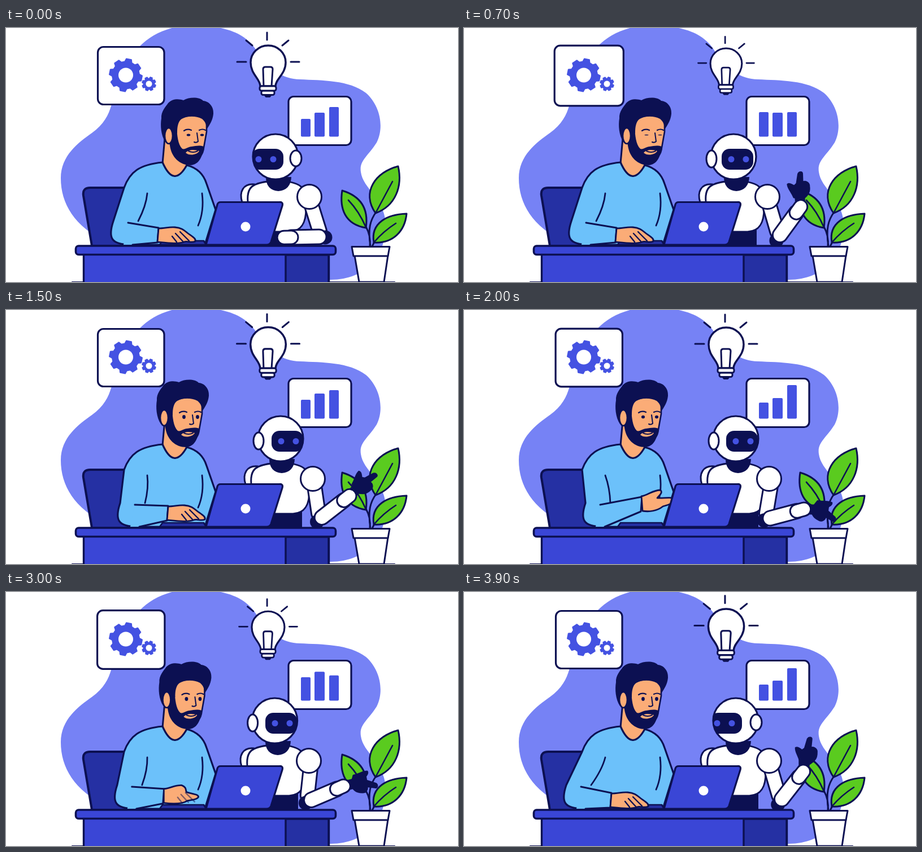
Animation, 800 px wide and 450 px high, one loop 4 s. Source, as an HTML page with a canvas:

```html
<!DOCTYPE html>
<html lang="en">
<head>
<meta charset="utf-8">
<title>Working together</title>
<style>
html, body { margin: 0; width: 100%; height: 100%; overflow: hidden; background: #fff; }
canvas { display: block; }
</style>
</head>
<body>
<canvas id="stage" width="800" height="450"></canvas>
<script>
const ctx = document.getElementById('stage').getContext('2d');
const NAVY = '#0c1052', BLUE = '#3a46d6', DARK = '#2530a3', ICON = '#4452e2',
      BLOB = '#7682f5', SHIRT = '#6cc1fa', SKIN = '#fbac77', LEAF = '#5acb1f', WHITE = '#fff';
const LOOP = 4000, STEP = 100, RAD = Math.PI / 180;

// Poses over time, eased from one to the next.
const times = [0, 700, 1500, 2000, 2700, 3400, 3900];
const icons = {
  bulb: [1, .9, 1.01, 1, .9, .99, 1.02],
  card: [0, 2.3, 0, .4, 0, 2.3, 0],
  bar1: [161, 149, 159, 164, 146, 159, 164],
  bar2: [150, 150, 148, 156, 146, 134, 157],
  bar3: [140, 149, 142, 133, 151, 143, 135]
};
const man = {
  head: [0, 0, -8, -6, -2, -6, -6],
  elbow: [186, 186, 198, 211, 203, 177, 177],
  cuffX: [269, 269, 286, 314, 291, 260, 260],
  cuffY: [367, 367, 360, 344, 357, 369, 369],
  open: [0, 0, 0, 1, .8, 0, 0]
};
const robot = {
  head: [477, 477, 486, 481, 476, 475, 481],
  face: [-14, 7, 12, 11, 13, 9, -17],
  body: [0, 0, 6, 3, -1, -1, 3],
  elbow: [558, 557, 556, 538, 534, 541, 560],
  arm: [-181, -54, -38, -15, -15, -36, -52],
  palm: [-180, -95, -45, 2, 2, -38, -80],
  finger: [-180, -88, -35, 35, 35, -25, -80]
};
const blinks = [-100, 700, 2150, 2700];

function pose(track, t) {
  let i = 0;
  while (i < times.length - 2 && t >= times[i + 1]) i++;
  const u = Math.min(1, (t - times[i]) / (times[i + 1] - times[i]));
  const k = u * u * (3 - 2 * u);
  const out = {};
  for (const key in track) out[key] = track[key][i] + (track[key][i + 1] - track[key][i]) * k;
  return out;
}

function ink(shape, fill, width = 3, color = NAVY) {
  const p = typeof shape === 'string' ? new Path2D(shape) : shape;
  if (fill) { ctx.fillStyle = fill; ctx.fill(p); }
  if (width) { ctx.lineWidth = width; ctx.strokeStyle = color; ctx.stroke(p); }
}

function oval(x, y, rx, ry = rx) {
  const p = new Path2D();
  p.ellipse(x, y, rx, ry, 0, 0, 7);
  return p;
}

function box(x, y, w, h, r) {
  const p = new Path2D();
  p.roundRect(x, y, w, h, r);
  return p;
}

function line(x1, y1, x2, y2, width = 3, color = NAVY) {
  ink(`M${x1} ${y1}L${x2} ${y2}`, null, width, color);
}

function limb(x1, y1, x2, y2, w) {
  line(x1, y1, x2, y2, w);
  line(x1, y1, x2, y2, w - 6, WHITE);
}

const polar = (x, y, deg, d) => [x + Math.cos(deg * RAD) * d, y + Math.sin(deg * RAD) * d];

function gear(x, y, r, tooth, hole, turn) {
  const p = new Path2D();
  for (let i = 0; i < 8; i++) {
    const a = turn + i * 45;
    for (const [da, d] of [[-15, r], [-9, r + tooth], [9, r + tooth], [15, r]]) p.lineTo(...polar(x, y, a + da, d));
  }
  p.closePath();
  ink(p, ICON, 2, ICON);
  ink(oval(x, y, hole), WHITE, 0);
}

function drawBackdrop() {
  ink('M97 266C97 226 128 203 152 186C195 155 184 120 203 85C222 38 260-5 335-5C400-3 425 15 440 35' +
      'C465 75 490 90 520 91C560 93 607 92 637 115C662 137 670 175 656 203C640 228 625 235 628 255' +
      'C632 285 668 300 672 345C674 400 640 446 575 446L300 446L180 380C120 352 97 310 97 266Z', BLOB, 0);
  line(117, 450, 688, 450, 2);
}

function drawIcons(p) {
  const g = p.card;
  ink(box(162.5 - g, 33.5 - g, 117.5 + 2 * g, 102 + 2 * g, 10), WHITE, 3.2);
  gear(212, 83.5, 24, 5, 13, -79);
  gear(253, 99, 9.5, 2.5, 5.5, -70);

  ink(box(500, 121.5, 111, 86, 9), WHITE, 3.2);
  [[522, 17, p.bar1], [546, 18, p.bar2], [572, 17, p.bar3]].forEach(([x, w, y]) =>
    ink(box(x, y, w, 192.5 - y, 2), ICON, 0));

  ctx.save();
  ctx.translate(463.5, 81);
  ctx.scale(p.bulb, p.bulb);
  ctx.translate(-463.5, -81);
  ink('M409 60H425M425 22L436 31M462 8V21M500 22L489 31M519 60H504', null, 3);
  ink('M450 103C450 90 433 82 433 61A31 30 0 0 1 495 61C495 82 477 90 477 103Z', WHITE, 3.4);
  ink('M456 103L455 73Q455 69 459 69H468Q472 69 472 73L470 103', null, 3);
  ink('M456 117H471L467 122H460Z', NAVY, 2);
  ink(box(452, 111, 23, 7.5, 3), WHITE, 3);
  ink(box(449, 103, 29, 8, 3), WHITE, 3);
  ctx.restore();
}

function drawPlant() {
  ink('M645 387C640 355 645 340 655 326M637 352Q646 368 644 387M652 379L648 387');
  ink('M654 328C628 290 655 255 694 245C702 280 690 315 654 328Z', LEAF);
  ink('M637 354C600 348 590 320 595 288C628 298 642 320 637 354Z', LEAF);
  ink('M651 380C645 345 675 330 709 329C706 360 685 382 651 380Z', LEAF);
  ink('M654 328L684 272M637 353Q625 325 606 305M651 380Q668 360 690 346', null, 2.6);
  ink('M617 403L625 450H669L676 403Z', WHITE);
  ink('M612 387.5H679L676 404H615Z', WHITE);
}

function drawRobotHead(x, face) {
  const y = 228, head = oval(x, y, 40), mid = x + face;
  ink(head, WHITE, 3.2);
  ctx.save();
  ctx.clip(head);
  ink(box(mid - 28, 214, 56, 37, 14), NAVY, 0);
  ctx.restore();
  const look = mid + (face < 0 ? -3 : 2);
  ink(oval(look - 13, 232.5, 5.5), ICON, 0);
  ink(oval(look + 13, 232.5, 5.5), ICON, 0);
  if (face > -4) ink(oval(x - 39, 232, 9, 15), WHITE);
  if (face < 4) ink(oval(x + 36, 231, 10, 14), WHITE);
}

const fist = 'M-15-9C-4-14 0-20 8-21C11-18 8-13 6-9L10-5L27-3C32-1 32 5 27 5L13 6C16 10 13 18 6 18C-4 20-10 16-16 9Z';

function drawRobotArm(p) {
  const sx = 537 + p.body, ey = 370;
  const [kx, ky] = polar(p.elbow, ey, p.arm, -7);
  const [fx, fy] = polar(p.elbow, ey, p.arm, 4);
  const [cx, cy] = polar(p.elbow, ey, p.arm, 53);
  const [wx, wy] = polar(p.elbow, ey, p.arm, 66);
  const [px, py] = polar(wx, wy, p.palm, 31);

  limb(sx + 3, 312, p.elbow - 3, 360, 28);
  ink(oval(kx, ky + 1, 11), NAVY);

  line(wx, wy, px, py, 18);
  ctx.save();
  ctx.translate(px, py);
  ctx.rotate(p.finger * RAD);
  ink(fist, NAVY, 2);
  ctx.restore();

  limb(fx, fy, cx, cy, 29);
  limb(cx, cy, wx, wy, 27);
  ink(oval(sx, 299, 21.5), WHITE);
}

function drawRobotBody(p) {
  ctx.save();
  ctx.translate(p.body, 0);
  ink('M465 355H518V386H460Z', NAVY, 0);
  ink('M440 277C420 275 412 290 418 309H434Z', WHITE);
  ink('M428 308Q426 284 440 278C460 268 512 268 524 283L531 320C531 344 524 360 502 361H465Z', WHITE);
  ink('M460 264Q460 287 482 289Q504 287 505 264Z', NAVY, 0);
  ctx.restore();
  drawRobotHead(p.head, p.face);
}

// Blends two strings of path numbers with the same layout.
function blend(a, b, k) {
  const to = b.match(/-?\d+/g);
  let i = 0;
  return a.replace(/-?\d+/g, n => (+n + (to[i++] - n) * k).toFixed(2));
}

const typing = 'M1 -12 C12 -12 20 -15 30 -14 C42 -13 46 -9 52 -4 C60 2 68 6 66 11 C60 14 52 10 46 12 C38 16 20 14 -1 12';
const offer = 'M0 -14 C12 -16 20 -25 34 -25 C38 -20 32 -16 28 -11 C40 -10 58 -14 57 -8 C56 0 44 2 38 4 C28 12 14 14 2 12';

function drawManHead(dx, lid) {
  ctx.save();
  ctx.translate(dx, 0);
  ink('M296 175C305 150 345 150 355 166L355 184L350 212C348 236 320 246 300 225Z', SKIN, 2.6);
  ink('M296 178C296 195 288 200 290 208C293 230 308 243 327 243C341 242 348 229 350 210' +
      'C342 207 336 209 329 210C322 210 317 216 312 214C304 206 303 190 302 176Z', NAVY, 0);
  ink('M318 221C323 215 334 215 342 218C338 225 324 227 318 221Z', SKIN, 0);
  ink('M323 218Q331 222 339 218', null, 2);
  ink('M282 202C274 190 273 172 275 160C274 148 283 139 287 133C294 125 306 125 314 128' +
      'C325 122 342 122 349 129C360 130 368 140 367 152C366 164 360 172 355 180C355 172 353 166 347 161' +
      'C335 155 320 156 311 161C304 166 303 176 303 186L297 195Z', NAVY, 0);
  ink(oval(288, 191, 7, 14), SKIN, 2.6);
  ink('M315 182Q321 178 328 181M342 181Q348 178 353 181', null, 2.2);
  ink('M338 186L340 201Q337 204 333 202', null, 2);
  for (const x of [323, 347]) ink(oval(x, 189.5, 3.6 - .7 * lid, .8 + 2.6 * lid), NAVY, 0);
  ctx.restore();
}

function drawMan(p, lid) {
  const e = p.elbow, x = p.cuffX, y = p.cuffY;
  ink('M152 386L137 297Q135 283 149 283H230V386Z', DARK, 4);
  ink('M281 195L277 240Q297 290 320 243V220Z', SKIN);
  ink(`M277 238C236 242 219 255 209 283L${e + 4} 342C${e - 6} 372 ${e} 384 ${e + 35} 384H352L371 322` +
      'L355 276Q347 250 320 243Q297 284 277 238Z', SHIRT, 3.2);
  ink(`M250 293Q${248 + (e - 186) * .4} 315 ${e + 48} 342`, null, 2.8);
  ink('M347 293Q351 325 340 350', null, 2.8);
  ink('M272 384L277 377H350L354 384Z', DARK, 2.6);

  const arm = `M${e + 30} 345L${x + 1} ${y - 13}L${x - 1} ${y + 13}`;
  ink(`${arm}L${e + 38} 384H${e + 22}Z`, SHIRT, 0);
  ink(`${arm}L${e + 38} 384`, null, 3);
  ctx.save();
  ctx.translate(x, y);
  ink(blend(typing, offer, p.open) + 'Z', SKIN, 2.8);
  ctx.globalAlpha = 1 - p.open;
  ink('M25 2L33 12M31-3L44 11M39-6L55 10', null, 2.4);
  ctx.restore();
  drawManHead(p.head, lid);
}

function drawDesk() {
  ink('M380 308.5H484Q491 308 489 315L469 379Q467 384 461 384H354L374 313Q375 308.5 380 308.5Z', BLUE, 3.2);
  ink(oval(424, 352, 8.5), WHITE, 0);
  ink('M137.5 400H571.5V456H137.5Z', BLUE, 3.4);
  ink('M495 402H571V456H495Z', DARK, 3.4);
  ink(box(123.5, 386, 460, 15.5, 5), BLUE, 3.6);
}

function draw(t) {
  const lid = Math.min(1, ...blinks.map(b => Math.abs(t - b) / 200));
  const bot = pose(robot, t);
  ctx.fillStyle = WHITE;
  ctx.fillRect(0, 0, 800, 450);
  ctx.lineCap = ctx.lineJoin = 'round';
  drawBackdrop();
  drawIcons(pose(icons, t));
  drawPlant();
  drawRobotBody(bot);
  drawRobotArm(bot);
  drawMan(pose(man, t), lid);
  drawDesk();
}

const start = performance.now();
let last = -1;
function tick() {
  const t = Math.floor((performance.now() - start) % LOOP / STEP) * STEP;
  if (t !== last) draw(last = t);
  requestAnimationFrame(tick);
}
tick();
</script>
</body>
</html>
```
